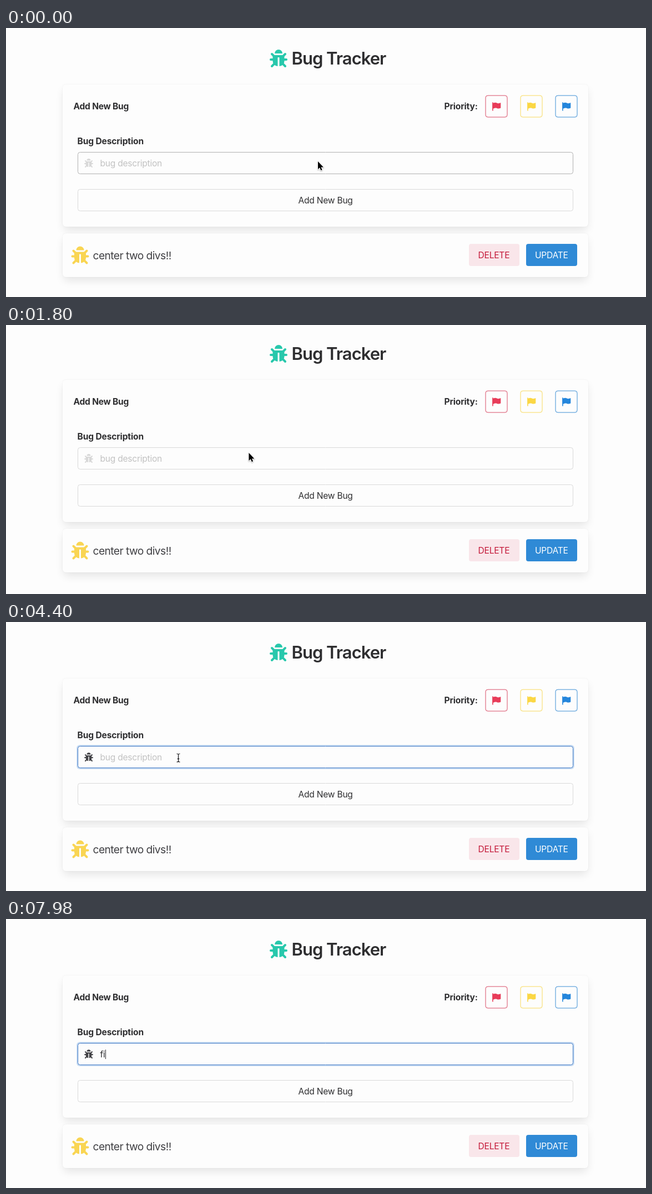
An HTML page with a canvas that plays this animation: 1153x486 px, repeating every 8 s.

```html
<!DOCTYPE html>
<html lang="en">
<head>
<meta charset="utf-8">
<title>Bug Tracker</title>
<style>
html, body { margin: 0; width: 100%; height: 100%; overflow: hidden; background: #fdfdfd; }
canvas { display: block; width: 1153px; height: 486px; }
</style>
</head>
<body>
<canvas id="stage"></canvas>
<script>
const W = 1153, H = 486, LOOP = 8000;
const SCROLL_START = 1250, SCROLL_END = 2460, FOCUS = 3910;
const TYPED = [[7700, 'f'], [7860, 'i']];
const INK = '#2e2e30';

const canvas = document.getElementById('stage');
const ctx = canvas.getContext('2d');
const dpr = window.devicePixelRatio || 1;
canvas.width = W * dpr;
canvas.height = H * dpr;

// Icons: the bug lives on a 512 grid, the flag on a 16 grid.
const bugBody = new Path2D('M141 160H371L424 197V336A144 144 0 0 1 280 480V236Q280 224 268 224H244Q232 224 232 236V480A144 144 0 0 1 88 336V197Z M145 112A112 112 0 0 1 369 112Z');
const bugLegs = new Path2D('M32 288H110M64 128L140 204M64 480L146 398M480 288H402M448 128L372 204M448 480L366 398');
const flagShape = new Path2D('M.6 1Q1.4 0 2.2 1V2.2C5 .9 7.4 1.3 9.4 2.2S13 2.6 15.8 1.5V10.9C13 12.3 11 12.2 9 11.4S5 11 2.2 12.2V16H.6Z');
const arrow = new Path2D('M0 0V14.2L3.2 11.3L5.3 16.3L7.6 15.3L5.5 10.5H9.9Z');
const ibeam = new Path2D('M-3-7.5Q-.5-7.5 0-6.3Q.5-7.5 3-7.5M0-6.3V6.3M-3 7.5Q-.5 7.5 0 6.3Q.5 7.5 3 7.5M-1.8 1.7H1.8');

function keys(t, list) {
  if (t <= list[0][0]) return list[0][1];
  for (let i = 1; i < list.length; i++) {
    const [t0, v0] = list[i - 1], [t1, v1] = list[i];
    if (t < t1) {
      const k = (t - t0) / (t1 - t0);
      return v0 + (v1 - v0) * k * k * (3 - 2 * k);
    }
  }
  return list[list.length - 1][1];
}

const scrollAt = t => Math.round(keys(t, [
  [SCROLL_START, 0], [1440, -2], [1700, -3], [1850, -3], [2060, -5], [2200, -5], [SCROLL_END, 0]
]));
const cursorX = t => keys(t, [[250, 562], [1150, 437.5], [2480, 437.5], [3080, 340], [3250, 340], [3720, 310.5]]);
const cursorY = t => keys(t, [[250, 241], [1150, 231], [2480, 231], [3080, 247], [3250, 247], [3720, 245.5]]);

function text(str, x, y, color, weight = 400, size = 15.6, space = -0.25) {
  ctx.font = `${weight} ${size}px Inter, "Open Sans", sans-serif`;
  ctx.letterSpacing = space + 'px';
  ctx.fillStyle = color;
  ctx.fillText(str, x, y);
}

function box(x, y, w, h, r, fill, line) {
  ctx.beginPath();
  ctx.roundRect(x, y, w, h, r);
  if (fill) { ctx.fillStyle = fill; ctx.fill(); }
  if (line) { ctx.strokeStyle = line; ctx.lineWidth = 1; ctx.stroke(); }
}

function card(y, h) {
  ctx.save();
  ctx.shadowColor = 'rgba(10,10,10,.1)';
  ctx.shadowBlur = 16 * dpr;
  ctx.shadowOffsetY = 8 * dpr;
  box(104, y + 2, 943, h - 4, 5, '#fdfdfd');
  ctx.restore();
  box(101, y - 1, 949, h + 2, 7, 'rgba(10,10,10,.02)');
  box(102, y, 947, h, 6, '#fdfdfd');
}

function bug(x, y, size, color) {
  ctx.save();
  ctx.translate(x, y);
  ctx.scale(size / 512, size / 512);
  ctx.fillStyle = ctx.strokeStyle = color;
  ctx.lineWidth = 64;
  ctx.lineCap = 'round';
  ctx.fill(bugBody);
  ctx.stroke(bugLegs);
  ctx.restore();
}

function flagButton(x, line, color) {
  box(x + .5, 122, 39, 39, 4, null, line);
  ctx.save();
  ctx.translate(x + 12, 133.5);
  ctx.fillStyle = color;
  ctx.fill(flagShape);
  ctx.restore();
}

function field(t) {
  const focused = t >= FOCUS;
  const hovered = t < SCROLL_START || t >= SCROLL_END;
  if (focused) box(127, 222, 897, 44, 6, '#c8dcf3');
  box(129.5, 224.5, 892, 39, 4, '#fdfdfd', focused ? '#3f78c4' : hovered ? '#b0b0b0' : '#d8d8d8');
  bug(141, 236, 16, focused ? '#444448' : '#d8d8d8');

  const typed = TYPED.filter(k => t >= k[0]);
  const value = typed.map(k => k[1]).join('');
  text(value || 'bug description', 169.5, 250, value ? INK : '#c2c2c2');

  if (!focused) return;
  const since = typed.length ? typed[typed.length - 1][0] : FOCUS;
  if ((t - since) % 1000 < 480) {
    const x = value ? Math.round(170 + ctx.measureText(value).width) : 170;
    ctx.fillStyle = '#303034';
    ctx.fillRect(x, 236, 1, 17);
  }
}

function pointer(t) {
  if (t >= TYPED[0][0]) return;
  ctx.save();
  ctx.translate(cursorX(t), cursorY(t));
  ctx.lineJoin = 'round';
  if (t < 2650) {
    ctx.shadowColor = 'rgba(0,0,0,.3)';
    ctx.shadowBlur = 2 * dpr;
    ctx.shadowOffsetY = dpr;
    ctx.strokeStyle = '#fff';
    ctx.lineWidth = 2;
    ctx.stroke(arrow);
    ctx.shadowColor = 'transparent';
    ctx.fillStyle = '#000';
    ctx.fill(arrow);
  } else {
    ctx.strokeStyle = 'rgba(255,255,255,.8)';
    ctx.lineWidth = 2.6;
    ctx.stroke(ibeam);
    ctx.strokeStyle = '#111114';
    ctx.lineWidth = 1.2;
    ctx.stroke(ibeam);
  }
  ctx.restore();
}

function page(t) {
  bug(475, 39, 32, '#28c8ac');
  text('Bug Tracker', 514.5, 66, INK, 600, 31, -1);

  card(102, 257);
  text('Add New Bug', 121.5, 147, INK, 700, 15.6, -0.25);
  text('Priority:', 789.5, 147, INK, 700, 15.6, -0.15);
  flagButton(863.5, '#d84c66', '#e83c59');
  flagButton(926.5, '#f8d95c', '#fbd745');
  flagButton(989.5, '#3c8ed4', '#2486dc');
  text('Bug Description', 128.5, 210, INK, 700, 15.6, -0.15);
  field(t);
  box(129.5, 291.5, 892, 39, 4, '#fdfdfd', '#dadada');
  text('Add New Bug', 526.5, 317, INK);

  card(371, 79);
  bug(117.5, 394.5, 32, '#f9d553');
  text('center two divs!!', 156.5, 417.5, '#404044', 400, 19.3, -0.6);
  box(834, 390, 91, 40, 4, '#f9e6ea');
  text('DELETE', 850.5, 416, '#c41a3a');
  box(937, 390, 92, 40, 4, '#2f8ad6');
  text('UPDATE', 953, 416, '#fff');
}

function draw() {
  const t = performance.now() % LOOP;
  ctx.setTransform(dpr, 0, 0, dpr, 0, 0);
  ctx.fillStyle = '#fdfdfd';
  ctx.fillRect(0, 0, W, H);
  ctx.save();
  ctx.translate(0, scrollAt(t));
  page(t);
  ctx.restore();
  pointer(t);
  requestAnimationFrame(draw);
}
draw();
</script>
</body>
</html>
```
